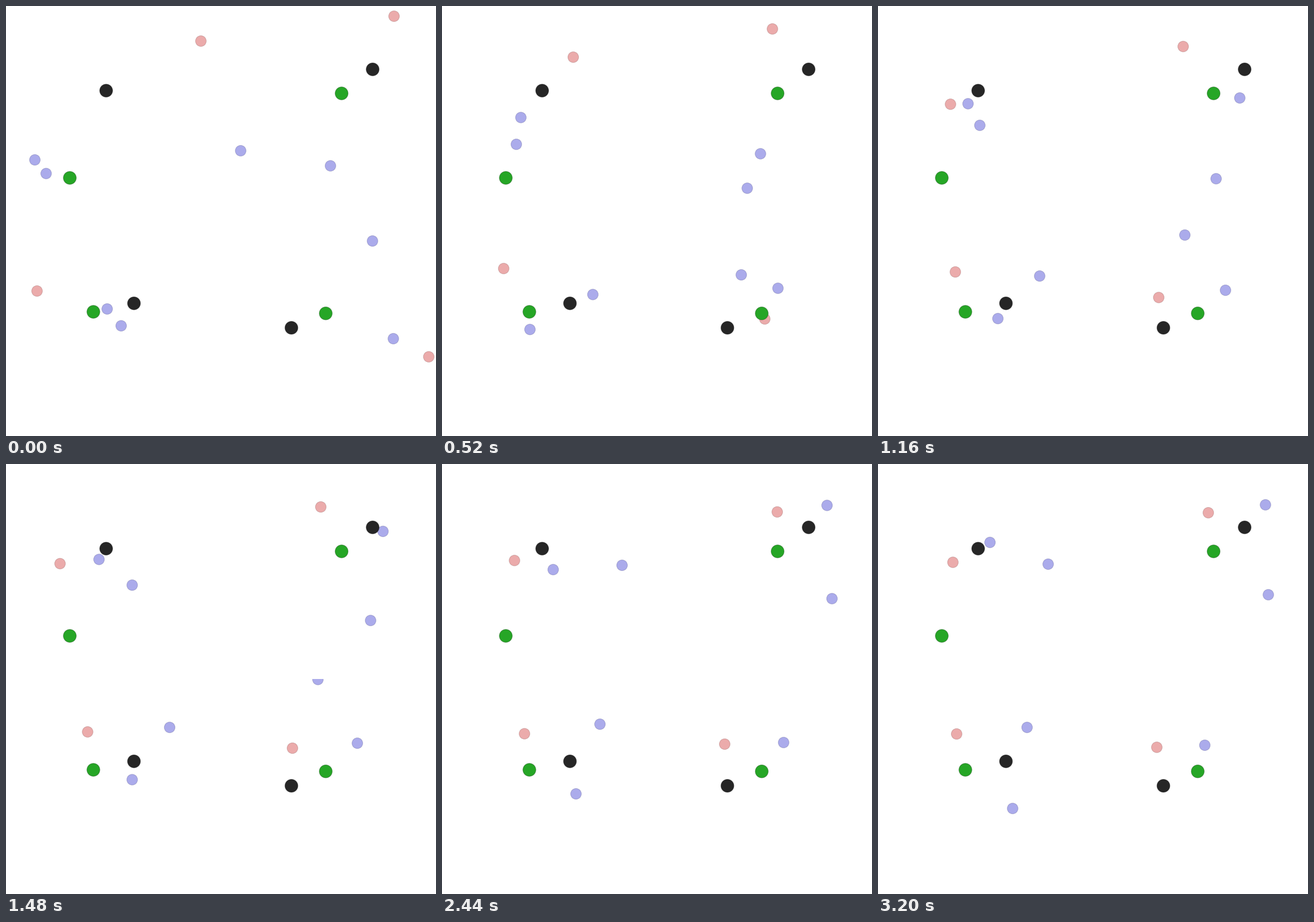
A matplotlib script for the animation above (3.24 s loop, 748x748 px).

```python
import numpy as np
import matplotlib.pyplot as plt
from matplotlib.animation import FuncAnimation
from matplotlib.patches import Circle

FRAMES, STEP_MS = 81, 40
SIZE, HALF, DPI = 748, 374, 68
AGENT_R, MARK_R = .05 * HALF / 2, .06 * HALF / 2
RED, BLUE = (.85, .35, .35), (.35, .35, .85)
BLACK, GREEN = (.15, .15, .15), (.15, .65, .15)
DAMPING = .75
TURNS = (0, 13, 21, 37, 48, 61)

plt.rcParams["toolbar"] = "None"
fig = plt.figure(figsize=(SIZE / DPI, SIZE / DPI), dpi=DPI, facecolor="white")
movers = []


def travel(n):
    """Way covered by a damped body pushed steadily from rest."""
    n = np.asarray(n, float)
    return n - DAMPING / (1 - DAMPING) * (1 - DAMPING ** n)


def path(*points):
    """Smooth run through the turning points; the last one ends the loop."""
    p = np.array(points, float)
    u = travel(TURNS[:len(p) - 1] + (FRAMES - 1,))
    now = travel(np.arange(FRAMES))
    i = np.clip(np.searchsorted(u, now, side="right") - 1, 0, len(u) - 2)
    h = (u[i + 1] - u[i])[:, None]
    s = (now - u[i])[:, None] / h
    m = np.gradient(p, u, axis=0)
    a = p[i] + s * h * m[i]
    b = p[i + 1] - (1 - s) * h * m[i + 1]
    near, far = (1 - s) ** 2, s ** 2
    return (near * (a + 2 * s * p[i])
            + far * (b + 2 * (1 - s) * p[i + 1]))


def disc(ax, pos, r, color, alpha, z):
    rim = tuple(c / 2 for c in color)
    return ax.add_patch(Circle(pos, r, facecolor=(*color, alpha),
                               edgecolor=(*rim, alpha / 2),
                               linewidth=72 / DPI, zorder=z))


def world(col, row, black, green, *tracks):
    """One chaser and two runners below two landmarks, clipped to a quarter."""
    ax = fig.add_axes([col / 2, (1 - row) / 2, .5, .5])
    ax.set_xlim(col * HALF, (col + 1) * HALF)
    ax.set_ylim((row + 1) * HALF, row * HALF)
    ax.axis("off")
    for z, (color, track) in enumerate(zip((RED, BLUE, BLUE), tracks)):
        movers.append((disc(ax, track[0], AGENT_R, color, .5, z), track))
    disc(ax, green, MARK_R, GREEN, 1, 4)
    disc(ax, black, MARK_R, BLACK, 1, 5)


world(0, 0, (174.2, 147.2), (111, 299),
      path((339, 61), (228.3, 89), (178, 148), (94, 173.3), (115, 168.6),
           (130.3, 171)),
      path((50.2, 267.7), (137.2, 194), (147.2, 200.3), (219.5, 210.7),
           (286.3, 200.2), (313.2, 176.2), (296, 174.2)),
      path((69.8, 291.4), (129.3, 240.6), (148, 192), (161.8, 166),
           (173.7, 176), (193.4, 183.7), (194.8, 136.4)))

world(1, 0, (637.8, 110.2), (583.8, 152),
      path((675, 17.8), (574.8, 39.9), (534, 60.7), (547.6, 74.7),
           (574.8, 80.3), (574.6, 84.8)),
      path((564.4, 278), (554, 257), (594.5, 209.5), (655.8, 117.2),
           (674.7, 82.5), (669.8, 72), (674, 71)),
      path((408.2, 251.8), (531, 317), (548, 320), (634.2, 272.2),
           (680.4, 241), (678.4, 234.2), (679, 227.4)))

world(0, 1, (222.6, 517.2), (152, 532),
      path((54, 495.8), (107.3, 456.7), (123.4, 459.2), (142, 466),
           (136.8, 469.6)),
      path((200.3, 556.3), (262.4, 501.9), (274.2, 484.5), (284.7, 458.2),
           (259.3, 458.2)),
      path((176, 527), (153, 562.7), (188.9, 545.7), (219.5, 549.1),
           (234.2, 599.2)))

world(1, 1, (496.5, 559.8), (556.2, 534.7),
      path((735.4, 610.2), (561.5, 544.4), (499, 523.8), (498.3, 494.3),
           (485, 492.8)),
      path((637.5, 408.8), (584.4, 491), (594.8, 499.2), (611.2, 485.7),
           (568.5, 489.2)),
      path((673.8, 578.7), (520.6, 467.7), (526, 427.2), (542.6, 374.9),
           (590, 250)))


def draw(n):
    for patch, track in movers:
        patch.center = track[n]
    return [patch for patch, _ in movers]


anim = FuncAnimation(fig, draw, frames=FRAMES, interval=STEP_MS,
                     repeat=True, repeat_delay=0, blit=False)
plt.show()
```
